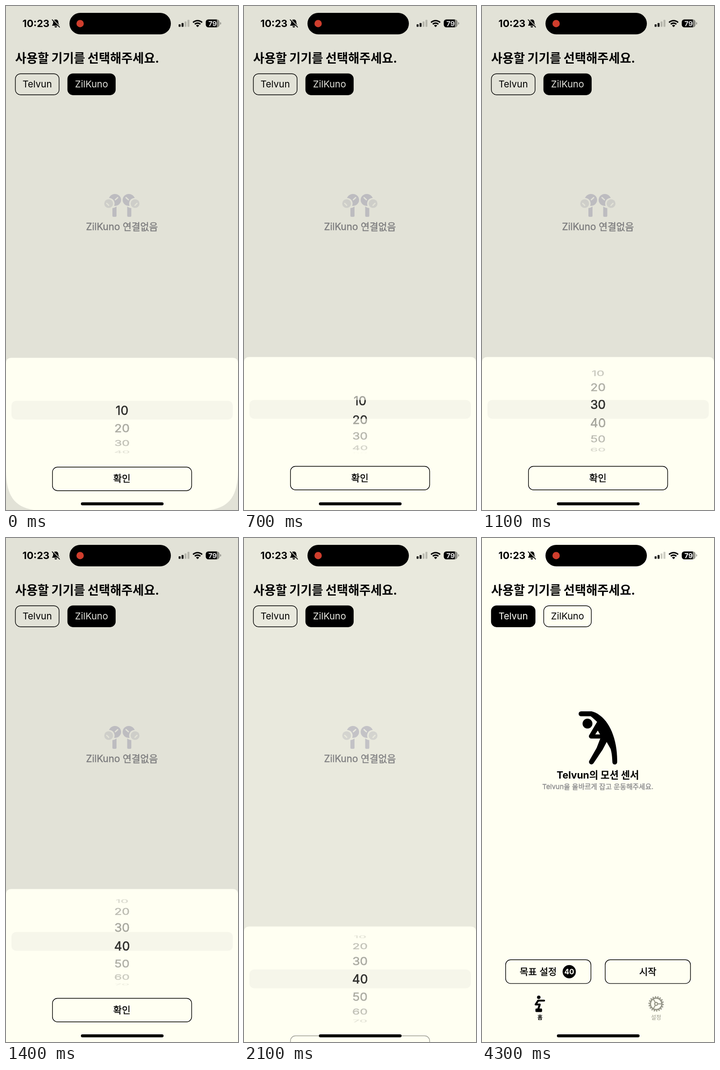
Write an HTML page that moves like this. It is 508 by 1102 pixels and loops after 5.6 s.

```html
<!DOCTYPE html>
<html lang="ko">
<head>
<meta charset="utf-8">
<title>기기 선택</title>
<style>
  html, body { margin: 0; width: 100%; height: 100%; overflow: hidden; background: #fffff2; }
  svg { display: block; width: 508px; height: 1102px; color: #000; }
  text { font-family: Inter, "Noto Sans CJK KR", sans-serif; font-size: 20.5px; white-space: pre; fill: currentColor; }
  .mid { text-anchor: middle; }
  .bold { font-weight: 700; }
  /* a hairline outline gives a weight between regular and bold */
  .medium { stroke: currentColor; stroke-width: .45; }
  .box { fill: none; stroke: #000; stroke-width: 1.4; }
  .muted { color: #8c8c8e; }
  .chosen .box { fill: #000; }
  .chosen text { color: #fffff8; }
  .disabled .box { stroke: #969692; }
  .disabled text { color: #8c8c88; }
  .line { fill: none; stroke: #000; }
  .num { font-size: 27px; text-anchor: middle; color: #2e2e2c; stroke: currentColor; stroke-width: .6; }
</style>
</head>
<body>
<svg viewBox="0 0 508 1102">
  <defs>
    <clipPath id="inBand"><rect y="94" width="508" height="41"/></clipPath>
    <clipPath id="offBand"><rect y="18" width="508" height="76"/><rect y="135" width="508" height="76"/></clipPath>
    <g id="bud">
      <ellipse cx="238.5" cy="424" rx="13.5" ry="13" fill="#d5d4d9"/>
      <path d="M239.5 423.5l5-4.5" stroke="#fffff2" stroke-width="2.8" stroke-linecap="round"/>
      <circle cx="225.5" cy="432" r="12.3" fill="#fffff2"/>
      <path d="M233 442q5.500-1 9-3.500V458.500a2.500 2.500 0 0 1-2.500 2.500h-4a2.500 2.500 0 0 1-2.500-2.500z" fill="#d5d4d9"/>
      <ellipse cx="224.8" cy="432" rx="9.700" ry="9.500" fill="#e8e8e3"/>
      <path d="M220.500 431.500l4.500 4.500" stroke="#fffff2" stroke-width="2.600" stroke-linecap="round"/>
    </g>
  </defs>

  <rect width="508" height="1102" fill="#fffff2"/>

  <!-- status bar -->
  <text class="bold" x="36" y="45.5" style="font-size:21.8px">10:23</text>
  <path d="M109 29.5c-4 0-5.7 3-5.7 6.5 0 4-2 5-2.5 7h16.4c-.5-2-2.5-3-2.5-7 0-3.5-1.7-6.5-5.7-6.5zM106.3 44.3h5.4a2.7 2.7 0 0 1-5.4 0"/>
  <path class="line" d="M102.5 29.5l16 16" style="stroke:#fffff2;stroke-width:2"/>
  <path class="line" d="M101.2 30.2l16 16" stroke-width="1.8" stroke-linecap="round"/>
  <rect x="378" y="40" width="4.2" height="5.5" rx="1"/>
  <rect x="384.5" y="37.3" width="4.2" height="8.2" rx="1"/>
  <g fill-opacity=".2">
    <rect x="391" y="33.8" width="4.2" height="11.7" rx="1"/>
    <rect x="397.4" y="30.3" width="4.2" height="15.2" rx="1"/>
  </g>
  <path class="line" stroke-width="3.2" d="M409.6 36.1a14 14 0 0 1 19.8 0M413.4 39.9a8.6 8.6 0 0 1 12.2 0"/>
  <path d="M419.5 46.3l-3.5-3.5a5 5 0 0 1 7 0z"/>
  <rect x="437.5" y="29.5" width="30" height="17" rx="5.5" fill-opacity=".4"/>
  <path d="M443 29.5h18.5v17h-18.5a5.5 5.5 0 0 1-5.5-5.5v-6a5.5 5.5 0 0 1 5.5-5.5z"/>
  <path d="M469 35a3.2 3.2 0 0 1 0 6z" fill-opacity=".4"/>
  <text class="mid bold" x="452.3" y="43.5" style="font-size:15px;color:#fff">79</text>

  <!-- device choice -->
  <text class="bold" x="20" y="124" style="font-size:26.8px;word-spacing:-1px">사용할 기기를 선택해주세요.</text>
  <g id="tabSensor">
    <rect class="box" x="20.5" y="148.2" width="95.8" height="46" rx="11.5"/>
    <text class="mid" x="68.4" y="178.4">Telvun</text>
  </g>
  <g id="tabBuds">
    <rect class="box" x="135.2" y="148.2" width="104.2" height="46" rx="11.5"/>
    <text class="mid" x="187.3" y="178.4">ZilKuno</text>
  </g>

  <g id="budsView">
    <use href="#bud"/>
    <use href="#bud" transform="matrix(-1 0 0 1 507.4 0)"/>
    <text class="mid medium muted" x="254" y="489.8" style="font-size:21px">ZilKuno 연결없음</text>
  </g>
  <g id="sensorView">
    <circle cx="231" cy="405.8" r="10.8"/>
    <path fill-rule="evenodd" d="M217 379H240C273 387 297 432 296 490a5.2 5.2 0 0 1-10.5 0C285 478 284 469 281.5 461L273 446 264 463 244.3 492.3a5.3 5.3 0 0 1-9.3-5.3L251 459 259 438.5H239a5 5 0 0 1-4.5-7L252 402C247 397 242 393 238 389.8H217a5.4 5.4 0 0 1 0-10.8zM253.5 421l-5.5 8.5h10.5z"/>
    <text class="mid bold" x="253.7" y="525.8" style="font-size:21.5px">Telvun의 모션 센서</text>
    <text class="mid medium muted" x="253.7" y="548.5" style="font-size:15px">Telvun을 올바르게 잡고 운동해주세요.</text>
  </g>

  <!-- bottom controls -->
  <g>
    <rect class="box" x="51.7" y="922.3" width="186.8" height="51.8" rx="11"/>
    <text class="medium" x="82.5" y="955.6">목표 설정</text>
    <circle cx="191" cy="948.3" r="14.5"/>
    <text class="mid bold" x="191" y="954" style="font-size:16px;color:#fffff8">40</text>
  </g>
  <g id="start">
    <rect class="box" x="269.7" y="922.3" width="186.8" height="51.8" rx="11"/>
    <text class="mid medium" x="363" y="955.6">시작</text>
  </g>
  <circle cx="124.3" cy="1004.3" r="3.8"/>
  <path class="line" stroke-width="4.2" stroke-linecap="round" stroke-linejoin="round" d="M136 1011.5H123l-5.5 8.5h9l-3 9"/>
  <rect x="117" y="1028.8" width="14.5" height="7.8" rx="2"/>
  <text class="mid medium" x="127" y="1052.5" style="font-size:12px">홈</text>
  <g class="line" style="stroke:#97978a">
    <circle cx="381.3" cy="1018.7" r="12.6" stroke-width="3"/>
    <circle cx="381.3" cy="1018.7" r="15.3" stroke-width="3.2" pathLength="36" stroke-dasharray="1"/>
    <circle cx="381.3" cy="1018.7" r="3.2" stroke-width="2.4"/>
    <path stroke-width="2.2" d="M384.8 1018.7h9M379.5 1015.7l-4.5-7.8M379.5 1021.7l-4.5 7.8"/>
  </g>
  <text class="mid" x="381.3" y="1052.5" style="font-size:12px;color:#97978a">설정</text>

  <rect id="dim" width="508" height="1102"/>

  <g id="sheet">
    <path id="panel" fill="#fffff2"/>
    <rect x="12" y="94" width="484.5" height="41" rx="10" fill="#f6f6ea"/>
    <g id="faded" clip-path="url(#offBand)"></g>
    <g id="sharp" clip-path="url(#inBand)"></g>
    <g id="confirm">
      <rect class="box" x="101.7" y="239" width="304.8" height="51.5" rx="11"/>
      <text class="mid medium" x="253.7" y="272">확인</text>
    </g>
  </g>

  <rect x="139" y="15" width="222" height="47" rx="23.5"/>
  <circle cx="162.3" cy="38.4" r="8" fill="#cf3e2d"/>
  <rect x="164" y="1085.2" width="181" height="6.6" rx="3.3"/>
</svg>
<script>
  const LOOP = 5600, STEP = 100, SHEET_TOP = 767.5, SHEET_H = 334.5;
  const RADIUS = 96, PITCH = 24.2 * Math.PI / 180, WHEEL_Y = 114.5, ROWS = 9;
  const $ = id => document.getElementById(id);

  function makeRows(parent) {
    return Array.from({ length: ROWS }, (_, i) => {
      const row = document.createElementNS('http://www.w3.org/2000/svg', 'text');
      row.setAttribute('class', 'num');
      row.setAttribute('y', 9.8);
      row.textContent = (i + 1) * 10;
      return parent.appendChild(row);
    });
  }
  const faded = makeRows($('faded')), sharp = makeRows($('sharp'));

  // a flick that decays and settles on the fourth row
  function wheelPos(t) {
    if (t < 700) return 0;
    if (t >= 1800) return 3;
    const decay = ms => Math.exp(-ms / 350), end = decay(1100);
    return 3 - 2.55 * (decay(t - 700) - end) / (1 - end);
  }

  function sheetDrop(t) {
    if (t < 100) return 1.7;
    if (t < 200) return 0.6;
    if (t < 2100) return 0;
    if (t < 2200) return 82;
    return t < 2300 ? 250 : SHEET_H;
  }

  // bottom corners of size r, curving smoothly into the sides
  function panelPath(r) {
    const w = 508, b = 335, k = r * 0.26;
    return `M0 12Q0 0 12 0H496Q${w} 0 ${w} 12V${b - r}` +
      `C${w} ${b - k} ${w - k} ${b} ${w - r} ${b}H${r}C${k} ${b} 0 ${b - k} 0 ${b - r}Z`;
  }

  function drawWheel(pos) {
    for (let i = 0; i < ROWS; i++) {
      const angle = (i - pos) * PITCH, squash = Math.cos(angle);
      const visible = Math.abs(angle) < 1.5;
      const place = `translate(254 ${WHEEL_Y + RADIUS * Math.sin(angle)}) scale(1 ${squash})`;
      for (const row of [faded[i], sharp[i]]) {
        row.style.display = visible ? '' : 'none';
        if (visible) row.setAttribute('transform', place);
      }
      faded[i].style.opacity = Math.max(0, 0.44 * squash);
    }
  }

  function draw(time) {
    const t = Math.floor(time % LOOP / STEP) * STEP;
    const drop = sheetDrop(t), open = t < 2300, sensor = t >= 4300;
    $('sheet').style.display = open ? '' : 'none';
    $('sheet').setAttribute('transform', `translate(0 ${SHEET_TOP + drop})`);
    $('panel').setAttribute('d', panelPath(t < 200 ? 92 : 0));
    $('confirm').style.opacity = t < 2100 ? 1 : 0.38;
    $('dim').style.opacity = 0.114 * (1 - (t < 200 ? 0 : drop / SHEET_H));
    drawWheel(wheelPos(t));
    $('tabSensor').classList.toggle('chosen', sensor);
    $('tabBuds').classList.toggle('chosen', !sensor);
    $('start').classList.toggle('disabled', !sensor);
    $('sensorView').style.display = sensor ? '' : 'none';
    $('budsView').style.display = sensor ? 'none' : '';
  }

  const began = performance.now();
  function tick() {
    draw(performance.now() - began);
    requestAnimationFrame(tick);
  }
  tick();
</script>
</body>
</html>
```
